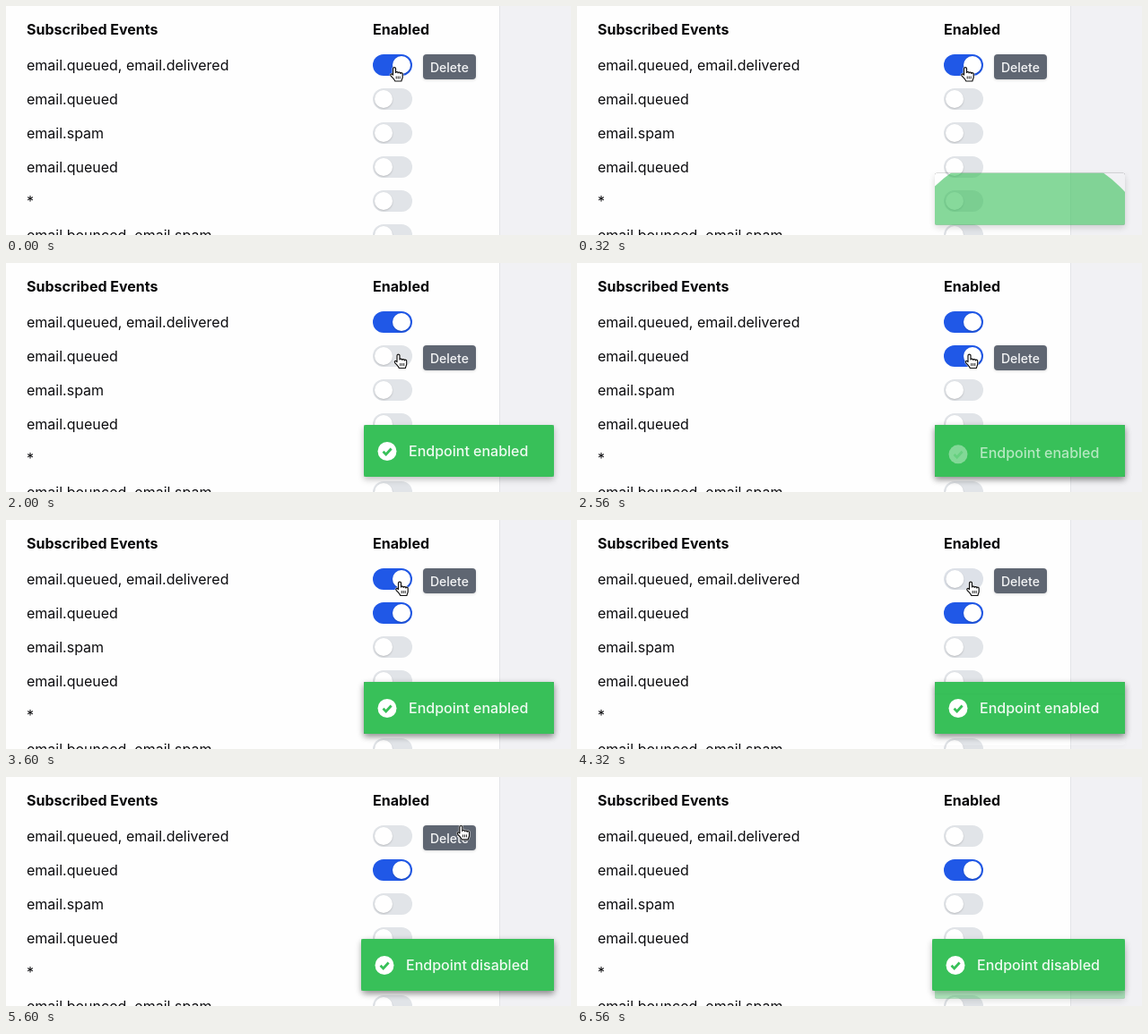
Animation, 630 px wide and 256 px high, one loop 6.64 s. Source, as an HTML page with a canvas:

```html
<!DOCTYPE html>
<html lang="en">
<head>
<meta charset="utf-8">
<title>Subscribed Events</title>
<style>
html, body { margin: 0; width: 100%; height: 100%; overflow: hidden; background: #fefefe; }
canvas { display: block; width: 630px; height: 256px; }
</style>
</head>
<body>
<canvas id="stage" width="630" height="256"></canvas>
<script>
const ctx = document.getElementById('stage').getContext('2d');
const LOOP = 6640, STEP = 80;
const FONT = 'Inter, "Open Sans", sans-serif';
const GREEN = '#38c059';
const OFF = [225, 228, 232], ON = [32, 88, 231];
const ROW_TOP = 47, ROW_H = 38;

const rows = [
  { text: 'email.queued, email.delivered', on: true, flip: 4140 },
  { text: 'email.queued', on: false, flip: 2140 },
  { text: 'email.spam', on: false },
  { text: 'email.queued', on: false },
  { text: '*', on: false },
  { text: 'email.bounced, email.spam', on: false }
];

const LIFE = 4015;
const toasts = [
  { start: 100, text: 'Endpoint enabled', left: 399 },
  { start: 2190, text: 'Endpoint enabled', left: 399 },
  { start: 4260, text: 'Endpoint disabled', left: 396 }
];

// Pointer path: time, x, y
const path = [
  [0, 433, 68.5], [640, 433, 68.5], [960, 433, 81], [1500, 433, 81],
  [1860, 437.5, 102], [2880, 437.5, 102], [3300, 439, 69],
  [5400, 439, 69], [5900, 645, 25]
];

const clamp = v => Math.min(1, Math.max(0, v));
const mix = (a, b, p) => a + (b - a) * p;

function bezier(x1, y1, x2, y2) {
  const at = (a, b, u) => 3 * a * u * (1 - u) ** 2 + 3 * b * u * u * (1 - u) + u ** 3;
  return x => {
    x = clamp(x);
    if (x === 0 || x === 1) return x;
    let lo = 0, hi = 1;
    for (let i = 0; i < 24; i++) {
      const mid = (lo + hi) / 2;
      if (at(x1, x2, mid) < x) lo = mid; else hi = mid;
    }
    return at(y1, y2, lo);
  };
}
const ease = bezier(0.25, 0.1, 0.25, 1);
const easeIn = bezier(0.42, 0, 1, 1);
const easeOut = bezier(0, 0, 0.58, 1);
const easeInOut = bezier(0.42, 0, 0.58, 1);

function label(text, x, y, size, weight, color) {
  ctx.font = `${weight} ${size}px ${FONT}`;
  ctx.fillStyle = color;
  ctx.fillText(text, x, y);
}

function box(x, y, w, h, r) {
  ctx.beginPath();
  ctx.roundRect(x, y, w, h, r);
}

function disc(x, y, r, color) {
  ctx.beginPath();
  ctx.arc(x, y, r, 0, 2 * Math.PI);
  ctx.fillStyle = color;
  ctx.fill();
}

function shadow(color, blur, dy) {
  ctx.shadowColor = color;
  ctx.shadowBlur = blur;
  ctx.shadowOffsetY = dy;
}

function drawToggle(row, cy, t) {
  const p = row.flip ? easeInOut((t - row.flip) / 200) : 0;
  const k = row.on ? 1 - p : p;
  ctx.fillStyle = `rgb(${OFF.map((c, i) => Math.round(mix(c, ON[i], k)))})`;
  box(409, cy - 12, 44, 24, 12);
  ctx.fill();
  ctx.save();
  shadow('rgba(0,0,0,.18)', 2, 1);
  disc(mix(421, 441, k), cy, 10, '#fff');
  ctx.restore();
}

function drawDelete(cy) {
  ctx.save();
  shadow('rgba(0,0,0,.15)', 3, 1);
  ctx.fillStyle = '#5f6672';
  box(465, cy - 12, 59, 28, 4);
  ctx.fill();
  ctx.restore();
  label('Delete', 473, cy + 8, 14, 500, '#f5f6f7');
}

function drawIcon(x, y) {
  disc(x, y, 10.5, '#fff');
  ctx.beginPath();
  ctx.moveTo(x - 4.5, y + 0.3);
  ctx.lineTo(x - 1.3, y + 3.4);
  ctx.lineTo(x + 4.6, y - 3);
  ctx.strokeStyle = GREEN;
  ctx.lineWidth = 2.8;
  ctx.stroke();
}

function drawToast({ start, text, left }, t) {
  const age = t - start, gone = age - LIFE;
  if (age <= 0 || gone >= 550) return;
  const enter = easeIn(age / 300);
  const leave = ease((gone - 250) / 300);
  const shown = enter * (1 - leave);
  const right = 611, w = right - left, h = 58;
  const y = 181 + (1 - shown) * h / 4;

  ctx.save();
  ctx.globalAlpha = shown;

  // Shadow outside the box only
  ctx.save();
  ctx.beginPath();
  ctx.rect(0, 0, 630, 256);
  ctx.roundRect(left, y, w, h, 2);
  ctx.clip('evenodd');
  shadow('rgba(0,0,0,.25)', 7, 3);
  ctx.fillStyle = '#000';
  box(left, y, w, h, 2);
  ctx.fill();
  ctx.restore();

  // Colour ripple rising from the lower right
  const s = easeOut(age / 400);
  box(left, y, w, h, 2);
  ctx.clip();
  disc(right - 148 * s, y + 400 - 380 * s, 200 * s, GREEN);

  const fade = ease(gone / 300);
  const part = (delay, height, draw) => {
    const p = ease((age - delay) / 300) * (1 - fade);
    ctx.save();
    ctx.globalAlpha = shown * p;
    ctx.translate(0, (1 - p) * height / 4);
    draw();
    ctx.restore();
  };
  part(300, 21, () => drawIcon(left + 26, y + 29.5));
  part(250, 24, () => label(text, left + 50, y + 35, 16, 500, '#effaf1'));
  ctx.restore();
}

const HAND = new Path2D('M4 9.5V2.6a1.5 1.5 0 0 1 3 0V7a1.4 1.4 0 0 1 2.7.3a1.4 1.4 0 0 1 2.6.6a1.3 1.3 0 0 1 2.4.9V12c0 1.5-1 2.5-1.3 4.5H6.2C5.8 14.5 3.8 13 1.5 10.3C.7 9 2.2 8 3.2 8.8z');
const CREASES = new Path2D('M7.7 11v3M9.7 11v3M11.7 11v3');
const ARROW = new Path2D('M0 0V13.6L3.1 10.8L5.2 15.6L7.4 14.7L5.3 10H9.6z');

function outline(shape, color, width) {
  ctx.strokeStyle = color;
  ctx.lineWidth = width;
  ctx.stroke(shape);
}

function drawPointer(x, y, hand) {
  ctx.save();
  ctx.lineJoin = 'round';
  if (hand) {
    ctx.translate(x - 5.5, y - 1);
    outline(HAND, 'rgba(255,255,255,.7)', 2.4);
    ctx.fillStyle = '#fff';
    ctx.fill(HAND);
    outline(HAND, '#111', 1.2);
    outline(CREASES, '#111', 0.9);
  } else {
    ctx.translate(x, y);
    shadow('rgba(0,0,0,.3)', 2, 1);
    outline(ARROW, '#fff', 2);
    shadow('transparent', 0, 0);
    ctx.fillStyle = '#0a0a0a';
    ctx.fill(ARROW);
  }
  ctx.restore();
}

function pointerAt(t) {
  for (let i = 1; i < path.length; i++) {
    const [t0, x0, y0] = path[i - 1], [t1, x1, y1] = path[i];
    if (t <= t1) {
      const p = easeInOut((t - t0) / (t1 - t0));
      return [mix(x0, x1, p), mix(y0, y1, p)];
    }
  }
  return null;
}

function draw(t) {
  ctx.fillStyle = '#fefefe';
  ctx.fillRect(0, 0, 630, 256);
  ctx.fillStyle = '#f1f1f4';
  ctx.fillRect(550, 0, 80, 256);
  ctx.fillStyle = '#e3e4e8';
  ctx.fillRect(550, 0, 1, 256);

  label('Subscribed Events', 23, 32, 16, 700, '#08080a');
  label('Enabled', 409, 32, 16, 700, '#08080a');

  const pointer = pointerAt(t);
  let hover = -1, hand = false;
  if (pointer) {
    const [x, y] = pointer;
    if (x < 550) hover = Math.floor((y - ROW_TOP) / ROW_H);
    const dy = y - (66 + hover * ROW_H);
    hand = hover >= 0 && Math.abs(dy) <= 12 &&
      ((x >= 409 && x <= 453) || (x >= 465 && x <= 524));
  }

  rows.forEach((row, i) => {
    const cy = 66 + i * ROW_H;
    label(row.text, 23, cy + 6, 16, 400, '#0c0c0f');
    drawToggle(row, cy, t);
    if (i === hover) drawDelete(cy);
  });
  toasts.forEach(toast => drawToast(toast, t));
  if (pointer) drawPointer(...pointer, hand);
}

const begin = performance.now();
function tick() {
  const t = (performance.now() - begin) % LOOP;
  draw(Math.floor(t / STEP) * STEP);
  requestAnimationFrame(tick);
}
tick();
</script>
</body>
</html>
```
